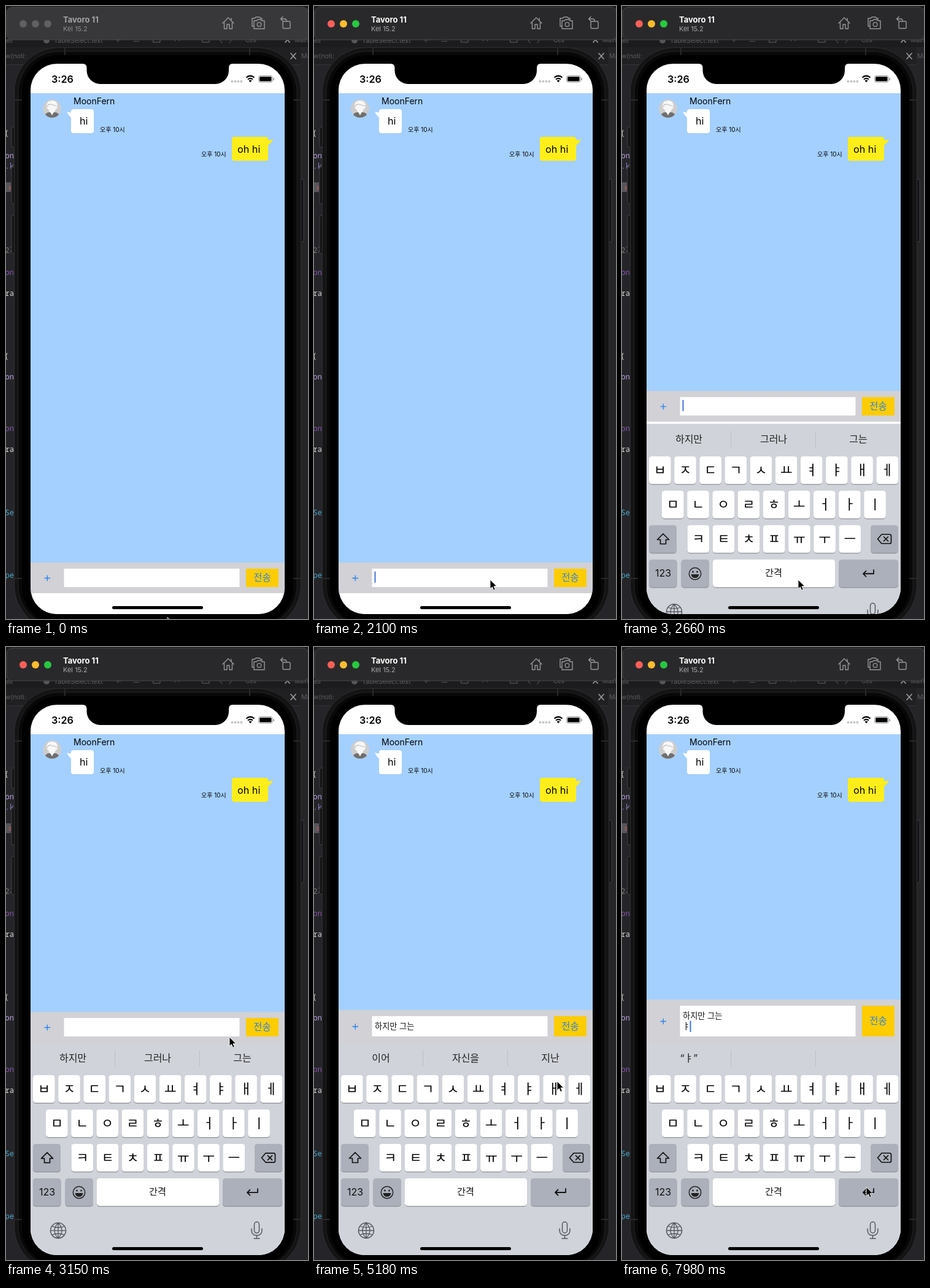
Write an HTML page that moves like this. It is 492 px wide and 998 px high and loops after 8 s.

```html
<!DOCTYPE html>
<html lang="ko">
<head>
<meta charset="utf-8">
<title>Chat simulator</title>
<style>
html, body { margin: 0; width: 100%; height: 100%; overflow: hidden; background: #242427; }
svg { display: block; width: 100%; height: 100%; }
text { font-family: Inter, "Noto Sans CJK KR", "Noto Sans CJK", sans-serif; }
.code { font-family: "Noto Sans Mono", "Noto Sans CJK KR", monospace; }
.line { fill: none; stroke-linecap: round; stroke-linejoin: round; }
</style>
</head>
<body>
<svg id="stage" viewBox="0 0 492 998" preserveAspectRatio="none"></svg>
<script>
const LOOP = 8000;
const BLUE = '#3080e0';

const rect = (x, y, w, h, fill, rx = 0, extra = '') =>
  `<rect x="${x}" y="${y}" width="${w}" height="${h}" rx="${rx}" fill="${fill}" ${extra}/>`;
const text = (str, x, y, size, fill = '#000', extra = '') =>
  `<text x="${x}" y="${y}" font-size="${size}" fill="${fill}" ${extra}>${str}</text>`;
const circle = (x, y, r, fill, extra = '') =>
  `<circle cx="${x}" cy="${y}" r="${r}" fill="${fill}" ${extra}/>`;
const line = (d, stroke, width = 1.5, extra = '') =>
  `<path class="line" d="${d}" stroke="${stroke}" stroke-width="${width}" ${extra}/>`;
const MID = 'text-anchor="middle"';

function editor() {
  const code = [
    ['{', 211, '#d8d8d8'], ['ona', 248, '#b9a1dc'], ['.k', 265, '#8e7ac0'], ['2가', 402, '#77777c'],
    ['onC', 438, '#8656a8'], ['rat', 472, '#d8d8d8'], ['{', 574, '#d8d8d8'], ['ona', 608, '#b9a1dc'],
    ['onC', 692, '#8656a8'], ['rat', 726, '#d8d8d8'], ['Se', 829, '#4ca6c8'], ['pe', 931, '#4ca6c8']
  ].map(([s, y, c]) => text(s, s === '{' ? -3 : -1.5, y, 12, c, 'class="code" font-weight="500"')).join('');
  const dim = '#626266';
  return rect(0, 0, 492, 998, '#252529') + rect(0, 0, 492, 67, '#1c1c1e') +
    rect(0, 67, 492, 29, '#202022') + rect(0, 95, 492, 1, '#343437') +
    rect(479, 67, 13, 931, '#252528') +
    text('ell', 0, 59.5, 10, dim) + circle(66, 56, 5, '#56565a') +
    text('TableSelect.text', 78, 59.5, 10.5, dim) +
    text('←', 179, 59, 10, dim) + text('≡', 206, 59, 13, dim) +
    line('M240 51h11v8h-11zM320 51h11v8h-11zM275 57l4-4 4 4M352 52l-3 4 3 4M364 52l3 4-3 4', dim, 1) +
    text('Cell', 390, 59, 10, dim) + text('Main', 470, 59, 10, dim) +
    line('M455 51l7 8M462 51l-7 8M464 77l8 9M472 77l-8 9', '#96969a', 1.8) +
    text('w(noti:', -1, 85, 10.5, '#5c5c60') + text('Main', 481, 85, 10.5, '#5c5c60') +
    rect(0, 287, 8, 16, '#55555a') + text('s', 3, 299, 11, '#c75a62', 'class="code"') + code;
}

function phone() {
  const button = (x, y, h) => rect(x, y, 7, h, '#151517', 2, 'stroke="#434347" stroke-width="1"');
  return button(9, 197, 33) + button(9, 262, 60) + button(9, 341, 62) + button(478, 282, 102) +
    rect(13.5, 67.5, 467, 948, '#141415', 72, 'stroke="#303033"') +
    rect(20, 74, 454, 936, '#080809', 66, 'stroke="#222224"') +
    line('M96 68v11M397 68v11M14 153h11M469 153h11M14 932h11M469 932h11', '#29292b', 2) +
    rect(26, 80, 442, 926, '#000', 60);
}

function titleBar() {
  const icon = '#98989a';
  return `<rect id="titleBg" x="1" y="2" width="492" height="53" rx="9" stroke="#47474a"/>` +
    ['r', 'y', 'g'].map((id, i) => `<circle id="${id}" cx="${28 + i * 20}" cy="29" r="6"/>`).join('') +
    text('Tavoro 11', 93, 27, 13, '#fff', 'id="title" font-weight="700"') +
    text('Kel 15.2', 93, 41, 11, '#a4a4a6', 'id="subtitle"') +
    line('M353 28l9-9 9 9M355.500 27v10h4.500v-7h4v7h4.500v-10M367 20v4', icon, 1.4) +
    line('M403 33h-2v-13h4l2-2h6l2 2h2v2', icon, 1.4) +
    line('M404 24h4l2-2h5l2 2h4v13h-17z', icon, 1.4) + circle(412.5, 30, 3.3, 'none', `stroke="${icon}" stroke-width="1.3"`) +
    rect(451, 25, 12, 11.5, 'none', 1.5, `stroke="${icon}" stroke-width="1.4"`) +
    line('M451 17.500l-3.500 3.500 3.500 3.500M448 21h6q3 0 3 3', icon, 1.4);
}

function statusBar() {
  return rect(40, 94, 414, 48, '#fff') +
    '<path d="M125 93h244v1q-6 0-6 7v4a22 22 0 0 1-22 22h-187.500a22 22 0 0 1-22-22v-4q0-7-6.500-7z"/>' +
    text('3:26', 74, 125, 16.2, '#000', 'font-weight="600"') +
    [0, 1, 2, 3].map(i => rect(366.5 + i * 5, 121, 3.6, 3.6, '#c4c4c6', 1)).join('') +
    line('M391.500 116.500q6.500-5.500 13 0M394 119.500q4-3.200 8 0', '#000', 2.2, 'style="stroke-linecap:butt"') +
    '<path d="M395.500 121.500q2.500-1.800 5 0l-2.500 2.800z"/>' +
    rect(411.5, 113.500, 22.500, 10.500, 'none', 3, 'stroke="#8a8a8a"') + rect(413, 115, 19.5, 7.5, '#000', 1.6) +
    rect(435.3, 117, 1.5, 4, '#8a8a8a', .7);
}

function chat() {
  return rect(40, 142, 414, 850, '#a4d0ff') +
    circle(75, 167, 15, '#cdcdcd') +
    '<path fill="#6f6f6f" d="M64 177q2-4 7-4h8q5 0 7 4a15 15 0 0 1-22 0z"/>' +
    '<path fill="#f7f7f7" d="M66 163q0-9 9-9t9 9q0 4-3 5-2 6-6 6t-6-6q-3-1-3-5z"/>' +
    line('M67 164q2-5 6-4 6 2 10 3', '#bdbdbd', 1.2) + '<path fill="#f7f7f7" d="M71 171h8l-4 7z"/>' +
    text('MoonFern', 110, 160, 14) +
    rect(106, 168, 37, 39, '#fff', 4) + '<path fill="#fff" d="M99 172q4 2 8 1v9q-4-2-8-10z"/>' +
    text('hi', 120, 193, 16.2) + text('오후 10시', 153, 205, 10) +
    rect(368, 213, 59, 39, '#ffee1a', 4) + '<path fill="#ffee1a" d="M435 217q-4 2-9 1v9q5-2 9-10z"/>' +
    text('oh hi', 377, 238.5, 16.2) + text('오후 10시', 318, 245, 10);
}

function inputBar() {
  return '<rect id="blank" x="40" width="414" height="420" fill="#fff"/>' +
    '<g id="bar"><rect id="barBg" x="40" width="414" fill="#d1d1d6"/>' +
    '<rect id="field" x="94.500" width="286" fill="#fff"/><rect id="send" x="391" width="53" fill="#ffcc00"/>' +
    line('M63 0h8.500M67.250-4.250v8.500', '#2581ec', 1.3, 'id="plus"') +
    text('전송', 417.5, 0, 15.4, BLUE, 'id="sendText" ' + MID) +
    text('', 99, -39, 13.2, '#111', 'id="upper"') + text('', 99, -22, 13.2, '#111', 'id="lower"') +
    '<rect id="caret" y="-35.500" width="2" height="18.500" rx="1" fill="#3b74dd"/></g>';
}

function keyboard() {
  const key = (x, y, w, fill = '#fff') =>
    rect(x, y + 1.2, w, 45, '#8d9096', 4.6) + rect(x, y, w, 45, fill, 4.6);
  const row = (letters, x, y) => [...letters].map((c, i) =>
    key(x + i * 41.15, y, 35.7) + text(c, x + 17.9 + i * 41.15, y + 30, 21.5, '#000', MID)).join('');
  const dark = '#acb0bb', ink = '#111', pale = '#55585e';
  return '<g id="keyboard">' + rect(40, 644, 414, 360, '#d0d3d9') +
    [109, 247, 385].map((x, i) => text('', x, 675, 16, '#222', `id="hint${i}" ${MID}`)).join('') +
    rect(177, 656, 1, 27, '#bcbfc5') + rect(315, 656, 1, 27, '#bcbfc5') +
    row('ㅂㅈㄷㄱㅅㅛㅕㅑㅐㅔ', 44, 697) + row('ㅁㄴㅇㄹㅎㅗㅓㅏㅣ', 65, 753) + row('ㅋㅌㅊㅍㅠㅜㅡ', 106.5, 809) +
    key(44, 809, 45, dark) + line('M67 823l-9.500 9.500h5v7h9v-7h5z', ink, 1.7) +
    key(405, 809, 45, dark) + line('M423 824h13q2.500 0 2.500 2.500v10q0 2.500-2.500 2.500h-13l-6.500-7.500zM426.500 828l7 7M433.500 828l-7 7', ink, 1.7) +
    key(44, 865, 45.5, dark) + text('123', 67, 893, 16, ink, MID) +
    key(96.5, 865, 45.5, dark) + circle(119, 888, 9.7, 'none', 'stroke="#222" stroke-width="1.5"') +
    circle(115.5, 885, 1.4, '#222') + circle(122.5, 885, 1.4, '#222') + '<path fill="#222" d="M112.500 889h13q-1 6-6.500 6t-6.500-6z"/>' +
    key(148, 865, 199) + text('간격', 247, 892, 15.2, ink, MID) +
    key(353, 865, 97, dark) + line('M410 882v6h-17M397.500 883.500l-4.500 4.500 4.500 4.500', ink, 1.8) +
    circle(85, 950, 12.5, 'none', `stroke="${pale}" stroke-width="1.5"`) +
    line('M85 937.500v25M72.500 950h25M75 943q10 4 20 0M75 957q10-4 20 0M85 937.500q-12 12.500 0 25M85 937.500q12 12.500 0 25', pale, 1.3) +
    rect(404.5, 936, 8, 18, 'none', 4, `stroke="${pale}" stroke-width="1.5"`) +
    line('M400 947v2q0 9 8.500 9t8.500-9v-2M408.500 958v5M404 963h9', pale, 1.5) + '</g>';
}

document.getElementById('stage').innerHTML =
  '<defs><clipPath id="screen"><rect x="40" y="94" width="414" height="896" rx="43"/></clipPath></defs>' +
  editor() + phone() +
  '<g clip-path="url(#screen)">' + chat() + inputBar() + keyboard() + statusBar() +
  rect(173, 977, 148, 5, '#000', 2.5) + '</g>' + titleBar() +
  '<path id="cursor" d="M0 0v15l3.400-3.200 2.300 5.400 2.600-1.100-2.300-5.300h4.700z" stroke="#fff" stroke-width=".9"/>';

const el = Object.fromEntries([...document.querySelectorAll('[id]')].map(e => [e.id, e]));
const set = (id, attrs) => { for (const k in attrs) el[id].setAttribute(k, attrs[k]); };

const START = ['하지만', '그러나', '그는'];
const QUOTED = ['“ㅑ”', '', ''];
// time, bar height, upper line, lower line, caret x, suggestions
const STATES = [
  [0, 50, '', '', 98.5, START],
  [3850, 53, '', '하지만', 139, ['그', '이', '그는']],
  [4550, 53, '', '하지만 그는', 166.5, ['이어', '자신을', '지난']],
  [5950, 70, '하지만 그는', '', 98.5, START],
  [6440, 70, '하지만 그는', 'ㅑ', 110.5, START],
  [6650, 70, '하지만 그는', 'ㅑ', 110.5, QUOTED]
];
// time, x, y of the pointer tip
const PATH = [
  [0, 263, 995], [70, 264, 990], [630, 290, 868], [770, 290, 866], [910, 290, 866], [1120, 291, 930],
  [1400, 291, 930], [1750, 287, 934], [2660, 287, 934], [3150, 364, 635], [3290, 355, 638],
  [3780, 112, 669], [4060, 112, 669], [4480, 384, 669], [4830, 385, 669], [5180, 396, 707],
  [5320, 394, 762], [5460, 394, 766], [5880, 398, 884], [6020, 398, 884], [6370, 352, 722],
  [6440, 352, 720], [6510, 365, 690], [6720, 368, 692], [7140, 397, 866], [7350, 398, 879], [8000, 398, 879]
];
const CARET_ON = [[910, 1450], [1960, 2800], [3430, 3600], [3850, 4970], [5320, 6950], [7350, 8200]];

const clamp = v => Math.max(0, Math.min(1, v));

function pointer(t) {
  const i = Math.max(1, PATH.findIndex(p => p[0] > t));
  const [a, b] = [PATH[i - 1], PATH[i]];
  const u = clamp((t - a[0]) / (b[0] - a[0])), s = u * u * (3 - 2 * u);
  return [a[1] + (b[1] - a[1]) * s, a[2] + (b[2] - a[2]) * s];
}

// Critically damped rise of the keyboard: 1 = hidden, 0 = settled
function hidden(t) {
  const k = Math.max(0, t - 2433) / 1000 * 16.8;
  return t > 3220 ? 0 : Math.exp(-k) * (1 + k);
}

function render(t) {
  const [, h, upper, lower, caretX, hints] = STATES.filter(s => s[0] <= t).pop();
  const rest = hidden(t), bottom = 644 + 312 * rest;
  set('bar', { transform: `translate(0 ${bottom})` });
  set('blank', { y: bottom - 1 });
  set('barBg', { y: -h, height: h });
  for (const id of ['field', 'send']) set(id, { y: 10 - h, height: h - 20 });
  set('plus', { transform: `translate(0 ${.5 - h / 2})` });
  set('sendText', { y: 5 - h / 2 });
  el.upper.textContent = upper;
  el.lower.textContent = lower;
  const glow = Math.max(...CARET_ON.map(([a, b]) => Math.min(clamp((t - a) / 140), clamp((b + 140 - t) / 140))));
  set('caret', { x: caretX, opacity: glow });
  set('keyboard', { transform: `translate(0 ${346 * rest})`, visibility: rest === 1 ? 'hidden' : 'visible' });
  hints.forEach((s, i) => { el['hint' + i].textContent = s; });

  const active = t >= 770;
  set('titleBg', { fill: active ? '#29292b' : '#38383b' });
  ['#ff5f57', '#febc2e', '#28c840'].forEach((c, i) => set('ryg'[i], { fill: active ? c : '#606063' }));
  set('title', { fill: active ? '#fff' : '#a2a2a4' });
  set('subtitle', { fill: active ? '#a8a8aa' : '#8c8c8e' });
  set('cursor', { transform: `translate(${pointer(t).join(' ')})` });
}

const began = performance.now();
function tick() {
  render((performance.now() - began) % LOOP);
  requestAnimationFrame(tick);
}
tick();
</script>
</body>
</html>
```
